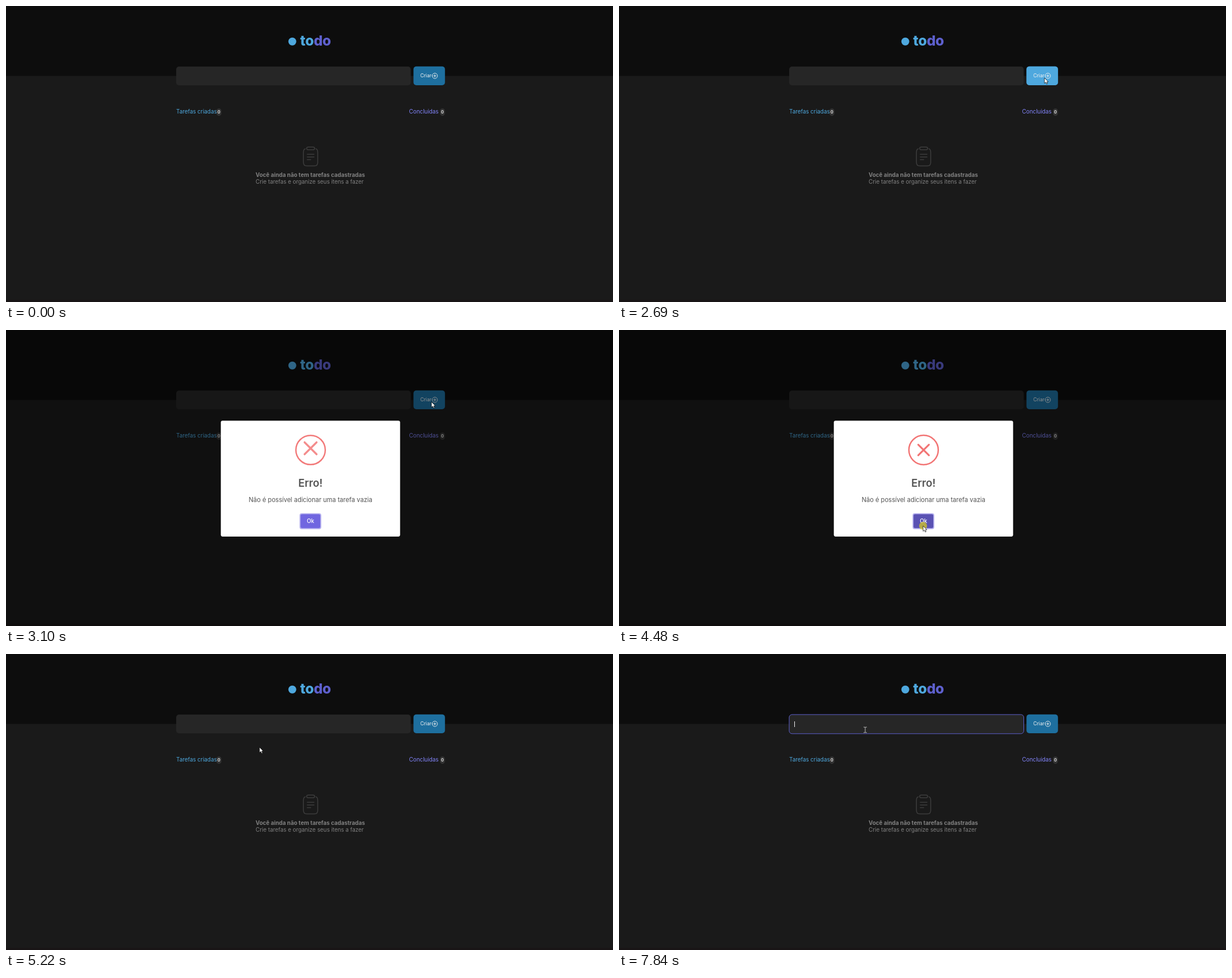
Animation of 1070x523 px, one loop 8000 ms. Source, as an HTML page:

```html
<!DOCTYPE html>
<html lang="pt">
<head>
<meta charset="utf-8">
<title>todo</title>
<style>
  html, body { margin: 0; width: 100%; height: 100%; overflow: hidden; background: #1a1a1a; }
  svg { display: block; width: 1070px; height: 523px; font: 9.87px Inter, sans-serif; }
  .bold { font-weight: 700; }
  .mid { text-anchor: middle; }
  .line { fill: none; stroke-linecap: round; stroke-linejoin: round; }
</style>
</head>
<body>
<svg viewBox="0 0 1070 523">
  <rect width="1070" height="523" fill="#1a1a1a"/>
  <rect width="1070" height="123.5" fill="#0d0d0d"/>
  <rect y="519" width="1070" height="4" fill="#191516"/>

  <circle cx="504.7" cy="62.8" r="7" fill="#4ea8de"/>
  <text x="518.5" y="70" font-size="24.7" font-weight="800" letter-spacing="-.3" fill="#4ea8de">to<tspan fill="#5e60ce">do</tspan></text>

  <rect x="300" y="107" width="413.5" height="33.3" rx="5" fill="#262626"/>
  <rect id="focus" x="300" y="107" width="413.5" height="33.8" rx="5" fill="none" stroke="#5e60ce"/>
  <rect id="caret" x="309" y="119" width="1" height="10" fill="#f2f2f2"/>

  <rect x="718.3" y="106.7" width="55.5" height="33.3" rx="5" fill="#1e6f9f"/>
  <rect id="hover" x="718.3" y="106.7" width="55.5" height="33.3" rx="5" fill="#4ea8de"/>
  <text x="730.2" y="126.4" font-size="8.64" fill="#f2f2f2">Criar</text>
  <path class="line" d="M751.2 123.4a4.7 4.7 0 1 0 9.4 0a4.7 4.7 0 1 0-9.4 0M753.6 123.4h4.6M755.9 121.1v4.6" stroke="#f2f2f2" stroke-width=".9"/>

  <text x="300" y="190" fill="#4ea8de">Tarefas criadas</text>
  <text x="710.6" y="190" fill="#8284fa">Concluidas</text>
  <g fill="#333">
    <rect x="371" y="181" width="8.6" height="13" rx="4.3"/>
    <rect x="765" y="181" width="8.6" height="13" rx="4.3"/>
  </g>
  <g class="mid bold" font-size="7.4" fill="#d9d9d9">
    <text x="375.3" y="190.2">0</text>
    <text x="769.3" y="190.2">0</text>
  </g>

  <g class="line" stroke="#3d3d3d" stroke-width="1.5">
    <path d="M527.5 252.3q-3.2 1-3.2 6v18.2q0 6 6 6h13.2q6 0 6-6v-18.2q0-5-3.2-6"/>
    <rect x="530" y="249.2" width="14" height="4.8" rx="2.4"/>
    <path d="M531 262h12M531 266.8h12M531 271.5h6.2"/>
  </g>
  <g fill="#808080">
    <text x="440" y="302" class="bold">Você ainda não tem tarefas cadastradas</text>
    <text x="440" y="314">Crie tarefas e organize seus itens a fazer</text>
  </g>

  <rect id="backdrop" width="1070" height="523"/>
  <g id="popup">
    <rect x="378.7" y="160.3" width="316" height="204.6" rx="3.1" fill="#fff"/>
    <g class="line" stroke="#f27474">
      <circle id="ring" r="25.9" stroke-width="2.5"/>
      <path id="cross" d="M-9.4-9.4L9.4 9.4M9.4-9.4L-9.4 9.4" stroke-width="3.1"/>
    </g>
    <g class="mid" fill="#545454">
      <text x="536.7" y="277.5" font-size="18.5" font-weight="600">Erro!</text>
      <text x="536.7" y="304" font-size="11.1">Não é possível adicionar uma tarefa vazia</text>
    </g>
    <rect x="517.4" y="323.7" width="38.4" height="28.2" rx="4" fill="#7066e0" opacity=".5"/>
    <rect x="519.2" y="325.5" width="34.8" height="24.6" rx="2.5" fill="#7066e0"/>
    <rect id="shade" x="519.2" y="325.5" width="34.8" height="24.6" rx="2.5"/>
    <text x="536.7" y="341.4" class="mid" font-weight="500" fill="#fff">Ok</text>
  </g>

  <circle id="halo" r="7" fill="#d8cc20" opacity=".72"/>
  <path id="arrow" d="M0 0V9.6L2.2 7.6L3.8 11L5.4 10.3L3.9 7H6.8Z" fill="#fff" stroke="#000" stroke-width=".7"/>
  <path id="ibeam" class="line" d="M-2.5-4.8H-.8L0-4.2L.8-4.8H2.5M0-4.2V4.2M-2.5 4.8H-.8L0 4.2L.8 4.8H2.5" stroke="#ccc" stroke-width=".9"/>
</svg>
<script>
const LOOP = 8000, OPEN = 2737, CLOSE = 4570;
const el = Object.fromEntries([...document.querySelectorAll('[id]')].map(n => [n.id, n]));

const clamp = v => Math.min(1, Math.max(0, v));
const within = (t, ...spans) => spans.some(([a, b]) => t >= a && t < b);
const ramp = (t, start, length) => clamp((t - start) / length);
const smooth = p => p * p * (3 - 2 * p);

// The CSS "ease" curve, cubic-bezier(.25, .1, .25, 1)
function ease(x) {
  let lo = 0, hi = 1, u = .5;
  const bezier = (a, b) => 3 * a * u * (1 - u) ** 2 + 3 * b * u * u * (1 - u) + u ** 3;
  for (let i = 0; i < 18; i++) {
    u = (lo + hi) / 2;
    if (bezier(.25, .25) < x) lo = u; else hi = u;
  }
  return bezier(.1, 1);
}

// Interpolates [position, ...values] stops with easing inside each segment
function tween(p, stops, curve) {
  if (p <= stops[0][0]) return stops[0].slice(1);
  const i = stops.findIndex(s => s[0] >= p);
  if (i < 0) return stops.at(-1).slice(1);
  const [a, ...from] = stops[i - 1], [b, ...to] = stops[i];
  const k = curve((p - a) / (b - a));
  return from.map((v, j) => v + (to[j] - v) * k);
}

const pointerPath = [
  [470, 978, 474], [950, 300, 104], [1109, 300, 104], [1110, 368, 126],
  [2010, 368, 126], [2480, 750, 127], [3220, 750, 127], [3580, 619, 350],
  [4200, 536, 346], [4640, 536, 346], [5020, 447, 165], [5200, 447, 165],
  [5560, 434, 134]
];

const show = (node, on) => node.setAttribute('visibility', on ? 'visible' : 'hidden');
const fade = (node, v) => node.setAttribute('opacity', v);
const place = (node, x, y, extra = '') => node.setAttribute('transform', `translate(${x} ${y}) ${extra}`);

function drawPointer(t) {
  const [x, y] = tween(t, pointerPath, smooth);
  const modal = within(t, [OPEN, CLOSE]);
  const overInput = !modal && x > 300 && x < 713 && y > 107 && y < 140;
  place(el.arrow, x, y);
  place(el.ibeam, x, y);
  place(el.halo, x, y);
  show(el.arrow, t >= 470 && !overInput);
  show(el.ibeam, t >= 470 && overInput);
  show(el.halo, within(t, [1350, 1490], [2550, 2680], [4400, 4560], [5630, 5770]));
  fade(el.shade, within(t, [4400, 4560]) ? .2 : modal && t > 3600 && x < 554 ? .1 : 0);
}

function drawPage(t) {
  show(el.focus, within(t, [1420, 2620], [5700, LOOP]));
  show(el.caret, within(t, [1420, 2010], [2540, 2620], [5700, 6230], [6830, 7310], [7840, LOOP]));
  fade(el.hover, ramp(t, 2410, 120) - ramp(t, OPEN, 150));
}

function drawModal(t) {
  const leave = ease(ramp(t, CLOSE, 150));
  const [grow] = tween(ramp(t, OPEN, 300), [[0, .7], [.45, 1.05], [.8, .95], [1, 1]], ease);
  const scale = grow * (1 - leave / 2);
  show(el.popup, within(t, [OPEN, CLOSE + 150]));
  fade(el.popup, 1 - leave);
  place(el.popup, 536.7, 262.6, `scale(${scale}) translate(-536.7 -262.6)`);
  fade(el.backdrop, .4 * (ramp(t, OPEN, 100) - ramp(t, CLOSE, 100)));

  const p = ramp(t, OPEN, 500), turn = ease(p);
  const flip = Math.cos((1 - turn) * Math.PI * 100 / 180);
  const [drop, size, alpha] = tween(p,
    [[0, 16, .4, 0], [.5, 16, .4, 0], [.8, -3.7, 1.15, .85], [1, 0, 1, 1]], ease);
  place(el.ring, 536.9, 212, `scale(1 ${flip})`);
  fade(el.ring, turn);
  place(el.cross, 536.9, 212 + drop, `scale(${size})`);
  fade(el.cross, alpha);
}

function frame() {
  const t = performance.now() % LOOP;
  drawPage(t);
  drawModal(t);
  drawPointer(t);
  requestAnimationFrame(frame);
}
frame();
</script>
</body>
</html>
```
